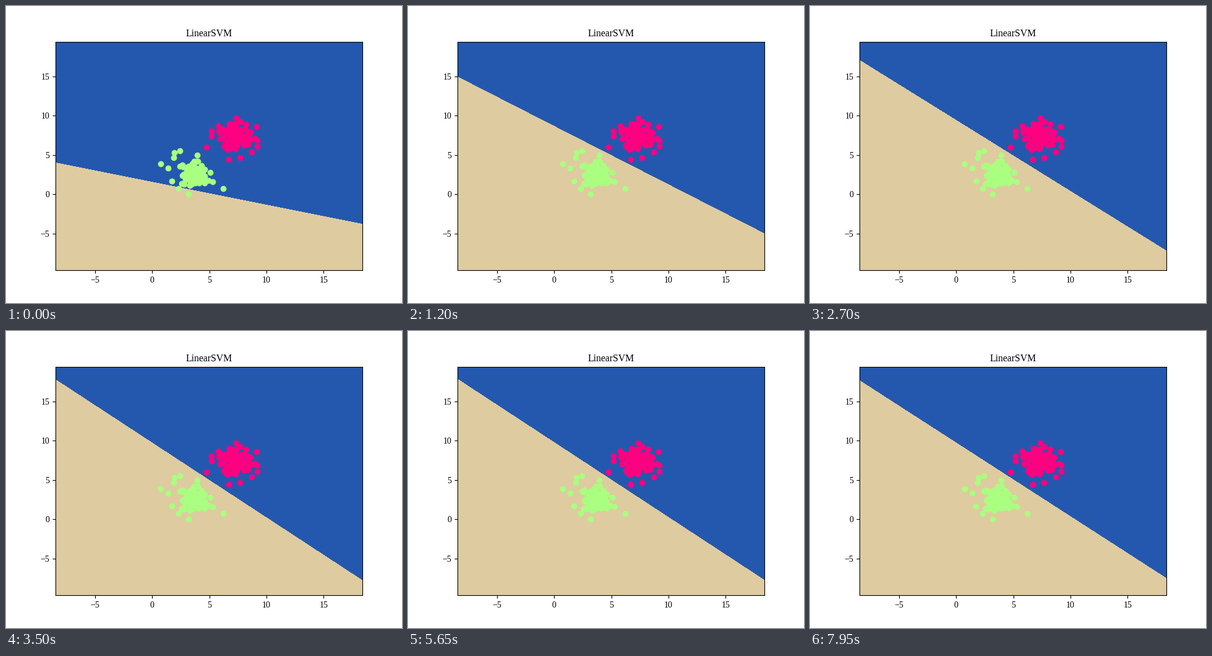
A matplotlib script that plays this animation: 640 by 480 pixels, repeating every 8 s.

```python
import numpy as np
import matplotlib.pyplot as plt
from matplotlib.animation import FuncAnimation

plt.rcParams["font.family"] = "Liberation Serif"

FRAMES, STEP = 160, 50
XLIM, YLIM = (-8.47, 18.39), (-9.65, 19.40)
BLUE, SAND = "#2458ae", "#decba0"
RED, LIME = "#ff0080", "#aaff80"


def cluster(rng, centre, spread, outliers, count=90):
    """Normal cloud cut off at two deviations, plus a few outliers."""
    z = rng.normal(size=(4 * count, 2))
    z = z[np.hypot(z[:, 0], z[:, 1]) < 2][:count]
    return np.vstack([np.array(centre) + z * spread, outliers]).T


def boundary(rng):
    """Data heights of the boundary at the left and right plot edges."""
    i = np.arange(FRAMES)
    # quick turn at the start, then a slow approach to the settled line
    keys = [0, 6, 24, 39, 70, 113, 136, 159]
    left = np.interp(i, keys, [4.0, 12.0, 14.9, 16.4, 17.7, 17.8, 17.5, 17.65])
    right = np.interp(i, keys, [-3.8, -4.0, -5.0, -6.7, -7.75, -7.75, -7.55, -7.55])
    # a brief overshoot once per cycle, turning about the middle
    phase = (i - 14 + 8) % 17 - 8
    kick = np.clip(1 - np.abs(phase) / 2, 0, 1) * (18.7 - left)
    kick += rng.normal(0, 0.05, FRAMES)
    return left + kick, right - kick


rng = np.random.default_rng(7)
y_left, y_right = boundary(rng)

fig, ax = plt.subplots(figsize=(6.4, 4.8), dpi=100)
fig.subplots_adjust(left=0.125, right=0.9, bottom=0.11, top=0.88)
ax.set(xlim=XLIM, ylim=YLIM, facecolor=BLUE,
       xticks=range(-5, 16, 5), yticks=range(-5, 16, 5))
ax.set_title("LinearSVM", fontsize=11.3)

region, = ax.fill([0, 0, 0, 0], [0, 0, 0, 0], color=SAND, lw=0,
                  antialiased=False, zorder=1)
ax.scatter(*cluster(rng, (7.3, 7.3), (0.85, 1.05),
                    [(7.35, 9.7), (9.15, 8.6), (4.75, 6.0), (6.7, 4.4),
                     (5.2, 8.05), (5.2, 7.45), (8.7, 5.4), (9.2, 6.1),
                     (9.2, 6.9), (5.75, 8.7), (7.65, 4.65)]),
           color=RED, zorder=2)
ax.scatter(*cluster(rng, (3.55, 2.65), (0.85, 0.85),
                    [(0.73, 3.88), (1.4, 3.3), (1.95, 5.3), (2.4, 5.55),
                     (1.88, 4.65), (3.95, 4.95), (1.7, 1.65), (2.3, 0.75),
                     (3.17, 0.05), (6.2, 0.75), (5.3, 1.6)]),
           color=LIME, zorder=2)


def draw(i):
    region.set_xy([(XLIM[0], YLIM[0]), (XLIM[0], y_left[i]),
                   (XLIM[1], y_right[i]), (XLIM[1], YLIM[0])])
    return region,


anim = FuncAnimation(fig, draw, frames=FRAMES, interval=STEP,
                     repeat=True, repeat_delay=0, blit=False)
plt.show()
```
